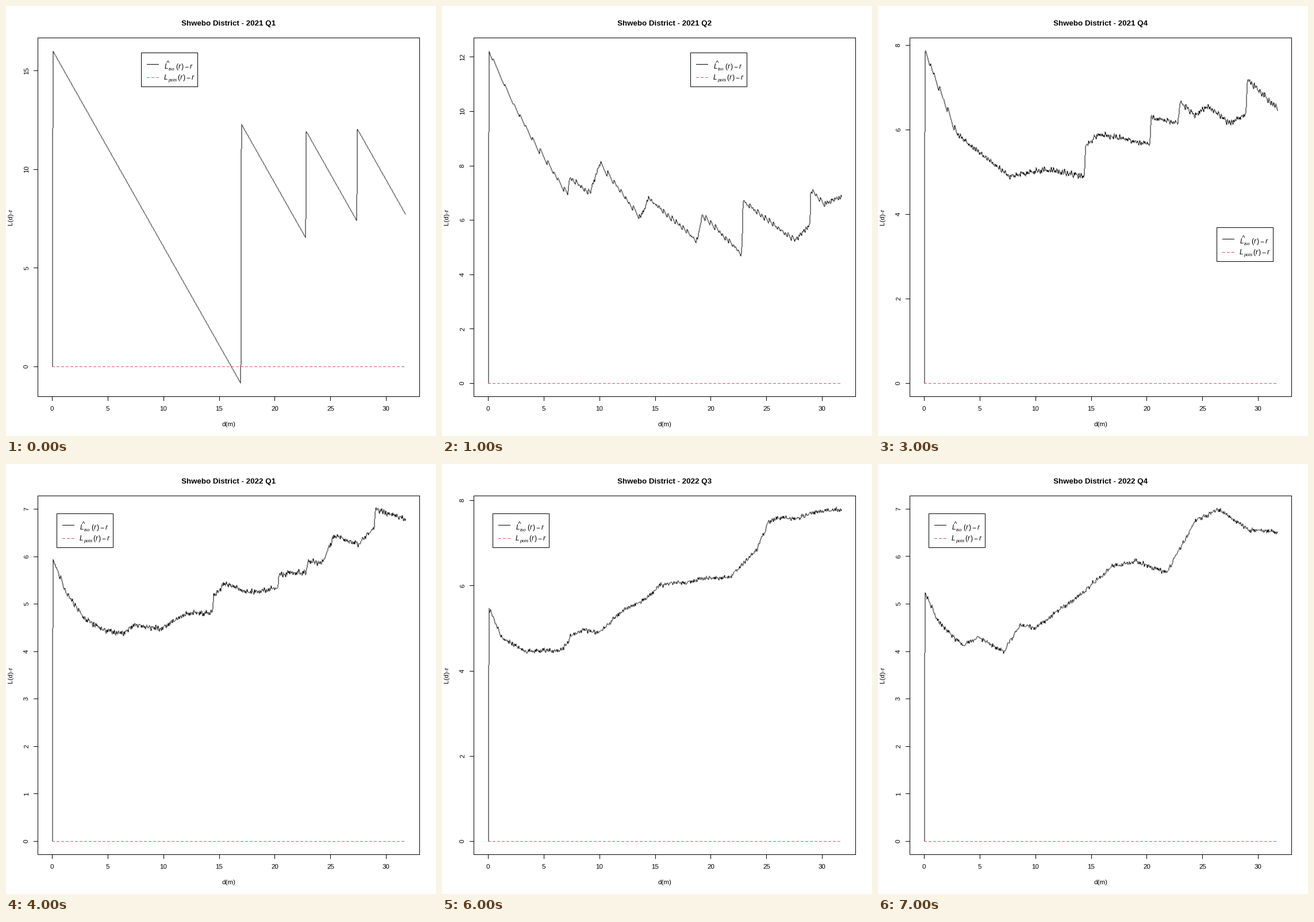
A matplotlib script that plays this animation: 748x748 px, repeating every 8 s.

```python
import numpy as np
import matplotlib.pyplot as plt
from matplotlib.animation import FuncAnimation
from matplotlib.patches import Rectangle

SIZE, DPI = 748, 100
PX = 72 / DPI                      # one pixel in points
LEFT, TOP, RIGHT, BOTTOM = 55, 55, 719, 679
R_MAX = 31.7
RED = "#DF536B"

plt.rcParams["font.family"] = "Liberation Sans"
radii = np.linspace(0, R_MAX, 513)


def falling(start, *jumps):
    """Fall with slope -1 from start, with a (radius, height) jump now and then."""
    return start - radii + sum(h * (radii > r) for r, h in jumps)


def through(*knots):
    return np.interp(radii, *zip(*knots))


def blend(a, b, peak):
    """Mean of two quarters, scaled to reach the given peak."""
    mean = (a + b) / 2
    return mean * peak / mean.max()


def sawtooth(values, grain, seed):
    """Let a trend climb in random steps of L(r) and fall with r between them."""
    out = values.copy()
    if grain:
        rng = np.random.default_rng(seed)
        levels = np.cumsum(rng.uniform(0.4, 1.6, int(60 / grain)) * grain)
        middles = (levels[1:] + levels[:-1]) / 2
        rising = np.maximum.accumulate(values + radii)
        out = levels[np.searchsorted(middles, rising)] - radii
    out[0], out[1] = 0, values[1]
    return out


# Trends by quarter, as a few key points
lone = falling(16.06, (16.93, 13.2), (22.75, 5.45), (27.32, 4.7))
spring = through((0.06, 12.22), (2.1, 10.4), (4, 8.95), (7.1, 6.95), (7.3, 7.55),
                 (9.1, 7), (10, 8.1), (13.6, 6.1), (14.4, 6.8), (18.7, 5.25),
                 (19.2, 6.2), (22.75, 4.75), (22.83, 6.7), (27.5, 5.25),
                 (28.85, 5.85), (28.92, 7.1), (30.2, 6.6), (31.7, 6.9))
summer = through((0.06, 8.8), (2.4, 6.95), (7.1, 4.62), (10.3, 4.2), (12, 4.55),
                 (13.63, 3.98), (13.71, 5), (14.6, 5.95), (16.7, 5.75),
                 (19, 4.82), (22.75, 5.48), (22.83, 6.35), (24.1, 6.25),
                 (24.85, 7.32), (26, 7.36), (28.5, 6.73), (30.7, 7.72), (31.7, 7.8))
autumn = through((0.06, 7.86), (2.9, 5.9), (7.6, 4.9), (11, 5.05), (14.38, 4.9),
                 (14.45, 5.6), (15.6, 5.9), (20.25, 5.65), (20.33, 6.3),
                 (22.75, 6.15), (22.95, 6.68), (24.2, 6.35), (25.5, 6.55),
                 (27.4, 6.15), (28.88, 6.4), (28.95, 7.2), (31.7, 6.5))
climb = through((0.06, 5.39), (1.2, 4.65), (4.9, 4.4), (6.4, 4.58), (7.4, 5.27),
                (9.8, 4.98), (12.1, 5.7), (14, 5.78), (15.3, 6.18), (17.7, 5.93),
                (22.7, 6.5), (24.1, 6.64), (25.2, 7.75), (27.5, 7.82),
                (29.1, 8.43), (31.7, 8.62))
settled = through((0.06, 5.25), (1.2, 4.65), (3.4, 4.13), (4.9, 4.3), (7.1, 4),
                  (8.6, 4.55), (10, 4.5), (14, 5.2), (16.9, 5.8), (19, 5.9),
                  (21.7, 5.65), (24.3, 6.75), (26.4, 7), (29.2, 6.55), (31.7, 6.52))

# title, trend, grain, tick step, legend corner
QUARTERS = [
    ("2021 Q1", lone, 0, 5, (235, 81)),
    ("2021 Q2", spring, 0.18, 2, (432, 81)),
    ("2021 Q3", summer, 0.12, 2, (594, 403)),
    ("2021 Q4", autumn, 0.13, 2, (589, 385)),
    ("2022 Q1", blend(autumn, climb, 7.0), 0.11, 1, (88, 86)),
    ("2022 Q2", climb, 0.11, 2, (88, 86)),
    ("2022 Q3", blend(climb, settled, 7.8), 0.1, 2, (88, 86)),
    ("2022 Q4", settled, 0.09, 1, (88, 86)),
]

fig = plt.figure(figsize=(SIZE / DPI, SIZE / DPI), dpi=DPI, facecolor="white")
ax = fig.add_axes([0, 0, 1, 1])


def put(x, y, text, size=11.5, ha="center", va="center", **style):
    ax.text(x, y, text, fontsize=size * PX, ha=ha, va=va, **style)


def block(x, y, width, height, color="black"):
    ax.add_patch(Rectangle((round(x), round(y)), width, height, fc=color,
                           lw=0, antialiased=False))


def frame(x, y, width, height):
    block(x, y, width + 1, height + 1)
    block(x + 1, y + 1, width - 1, height - 1, "white")


def dashes(start, end, y):
    for x in range(round(start), round(end), 8):
        block(x, y, min(5, round(end) - x), 1, RED)


def to_x(r):
    return LEFT + (RIGHT - LEFT) * (0.04 + r / R_MAX) / 1.08


def curve(x, y):
    """Fill, in every pixel column, the rows the line passes through."""
    columns = np.arange(round(x[0]), round(x[-1]) + 1)
    inside = columns[:, None] + np.linspace(-0.5, 0.5, 9)
    rows = np.floor(np.interp(inside, x, y) + 0.5)
    top = rows.min(axis=1)
    bottom = np.maximum(rows.max(axis=1), top + 1)
    edges = np.append(columns, columns[-1] + 1)
    ax.fill_between(edges, np.append(top, top[-1]), np.append(bottom, bottom[-1]),
                    step="post", color="black", lw=0, antialiased=False)


def formula(x, y, sub, tail):
    put(x, y, "L", 12, "left", "baseline", style="italic")
    put(x + 7, y + 2.5, sub, 8.3, "left", "baseline", style="italic")
    for sign, dx in zip("(r)\u2212r", (0, 5, 10, 15, 25)):
        put(tail + dx, y, sign, 12, "left", "baseline",
            style="italic" if sign == "r" else "normal")


def legend(x, y):
    frame(x, y, 98, 59)
    block(x + 10, y + 20, 21, 1)
    dashes(x + 10, x + 31, y + 43)
    put(x + 46.5, y + 22, "^", va="baseline")
    formula(x + 41, y + 28, "iso", x + 60)
    formula(x + 40, y + 47, "pois", x + 63)


def draw(i):
    title, trend, grain, step, corner = QUARTERS[i]
    low, high = min(0, trend.min()), trend[1:].max()

    def to_y(v):
        return BOTTOM - (BOTTOM - TOP) * (0.04 + (v - low) / (high - low)) / 1.08

    ax.clear()
    ax.set_axis_off()
    ax.set_xlim(0, SIZE)
    ax.set_ylim(SIZE, 0)

    frame(LEFT, TOP, RIGHT - LEFT, BOTTOM - TOP)
    for r in range(0, 31, 5):
        block(to_x(r), BOTTOM, 1, 8)
        put(to_x(r), 700.5, str(r))
    for v in range(0, int(high * 1.04) + 1, step):
        block(LEFT - 7, to_y(v), 7, 1)
        put(36, to_y(v), str(v), rotation=90)

    put(387.5, 34, "Shwebo District - " + title, 13.4, va="baseline",
        weight="bold")
    put(387.5, 728, "d(m)")
    put(8.5, 366.5, "L(d)-r", rotation=90)

    curve(to_x(radii), to_y(sawtooth(trend, grain, 7 + i)))
    dashes(to_x(0), to_x(R_MAX) + 1, to_y(0))
    legend(*corner)
    return []


anim = FuncAnimation(fig, draw, frames=len(QUARTERS), interval=1000,
                     init_func=lambda: [], repeat=True)
plt.show()
```
